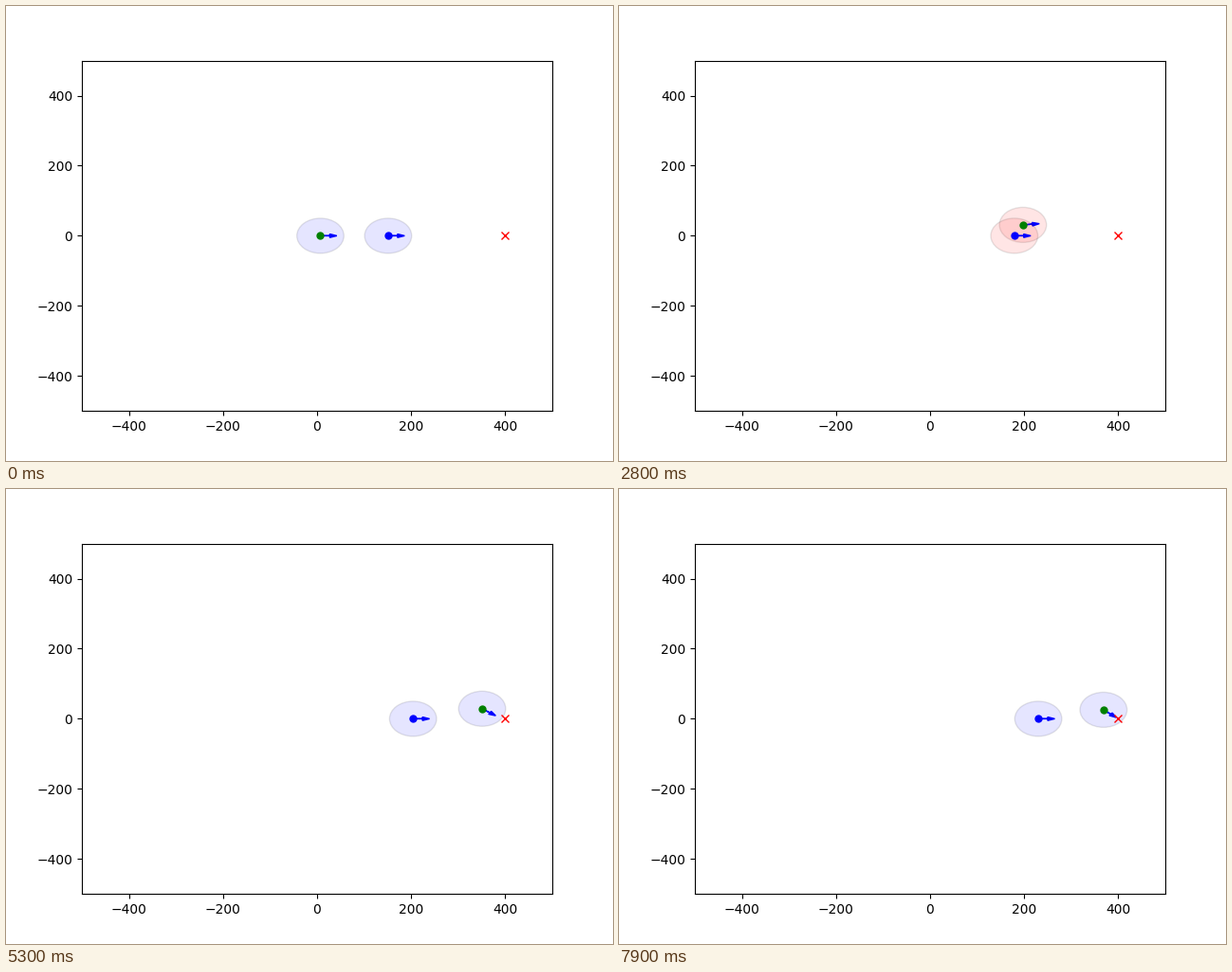
Write a matplotlib script that moves like this. It is 640x480 px and loops after 8000 ms.

```python
import numpy as np
import matplotlib.pyplot as plt
from matplotlib.animation import FuncAnimation
from matplotlib.patches import Circle, FancyArrow

FRAMES, INTERVAL = 80, 100
GOAL = (400, 0)
RADIUS = 50
ARROW = 20

DODGE_START, DODGE_END, DODGE_HEIGHT = 13, 30.5, 33
GLIDE_START, ORBIT_START = 45, 57
ORBIT_CENTRE, ORBIT_RADIUS, ORBIT_ANGLE, ORBIT_RATE = (353.5, 7), 24, 43, -16


def smoothstep(i, start, end):
    t = np.clip((i - start) / (end - start), 0, 1)
    return t * t * (3 - 2 * t)


def cruise(i):
    """Drive ahead, easing sideways around the other robot."""
    x = 7 + 7 * i - 0.35 * max(0, i - 12)
    return x, DODGE_HEIGHT * smoothstep(i, DODGE_START, DODGE_END)


def orbit(i):
    """Circle clockwise next to the goal."""
    a = np.radians(ORBIT_ANGLE + ORBIT_RATE * (i - ORBIT_START))
    x, y = ORBIT_CENTRE
    return x + ORBIT_RADIUS * np.cos(a), y + ORBIT_RADIUS * np.sin(a)


def glide(i):
    """Slow down from the cruise into the orbit."""
    t = (i - GLIDE_START) / (ORBIT_START - GLIDE_START)
    (x0, y0), (x1, y1) = cruise(GLIDE_START), orbit(ORBIT_START)
    return x0 + (x1 - x0) * t, y0 + (y1 - y0) * t * t


def runner(i):
    """Position and heading of the green robot."""
    if i >= ORBIT_START:
        turn = ORBIT_ANGLE - 90 + ORBIT_RATE * (i - ORBIT_START)
        return *orbit(i), np.radians(turn)
    turn = np.interp(i, [DODGE_START, 18, 24, 35, GLIDE_START, ORBIT_START],
                     [0, 20, 20, -20, -10, ORBIT_ANGLE - 90])
    pos = cruise(i) if i <= GLIDE_START else glide(i)
    return *pos, np.radians(turn)


def walker(i):
    """Position and heading of the blue robot."""
    return 151 + i, 0, 0


class Robot:
    def __init__(self, ax, color):
        self.zone = ax.add_patch(Circle((0, 0), RADIUS, ec="k", alpha=0.1))
        self.arrow = ax.add_patch(FancyArrow(
            0, 0, ARROW, 0, head_width=10, head_length=15, fc="b", ec="b"))
        self.dot, = ax.plot([0], [0], "o", color=color, markersize=5)

    def place(self, x, y, heading, warn):
        self.zone.center = x, y
        self.zone.set_facecolor("red" if warn else "blue")
        self.arrow.set_data(x=x, y=y, dx=ARROW * np.cos(heading),
                            dy=ARROW * np.sin(heading))
        self.dot.set_data([x], [y])


fig, ax = plt.subplots(figsize=(6.4, 4.8), dpi=100)
ax.set(xlim=(-500, 500), ylim=(-500, 500))
green, blue = Robot(ax, "green"), Robot(ax, "blue")
ax.plot(*GOAL, "rx")


def update(i):
    g, b = runner(i), walker(i)
    warn = np.hypot(g[0] - b[0], g[1] - b[1]) < 2 * RADIUS
    green.place(*g, warn)
    blue.place(*b, warn)
    return []


anim = FuncAnimation(fig, update, frames=FRAMES, interval=INTERVAL,
                     init_func=lambda: update(0), repeat=True, repeat_delay=0)
plt.show()
```
